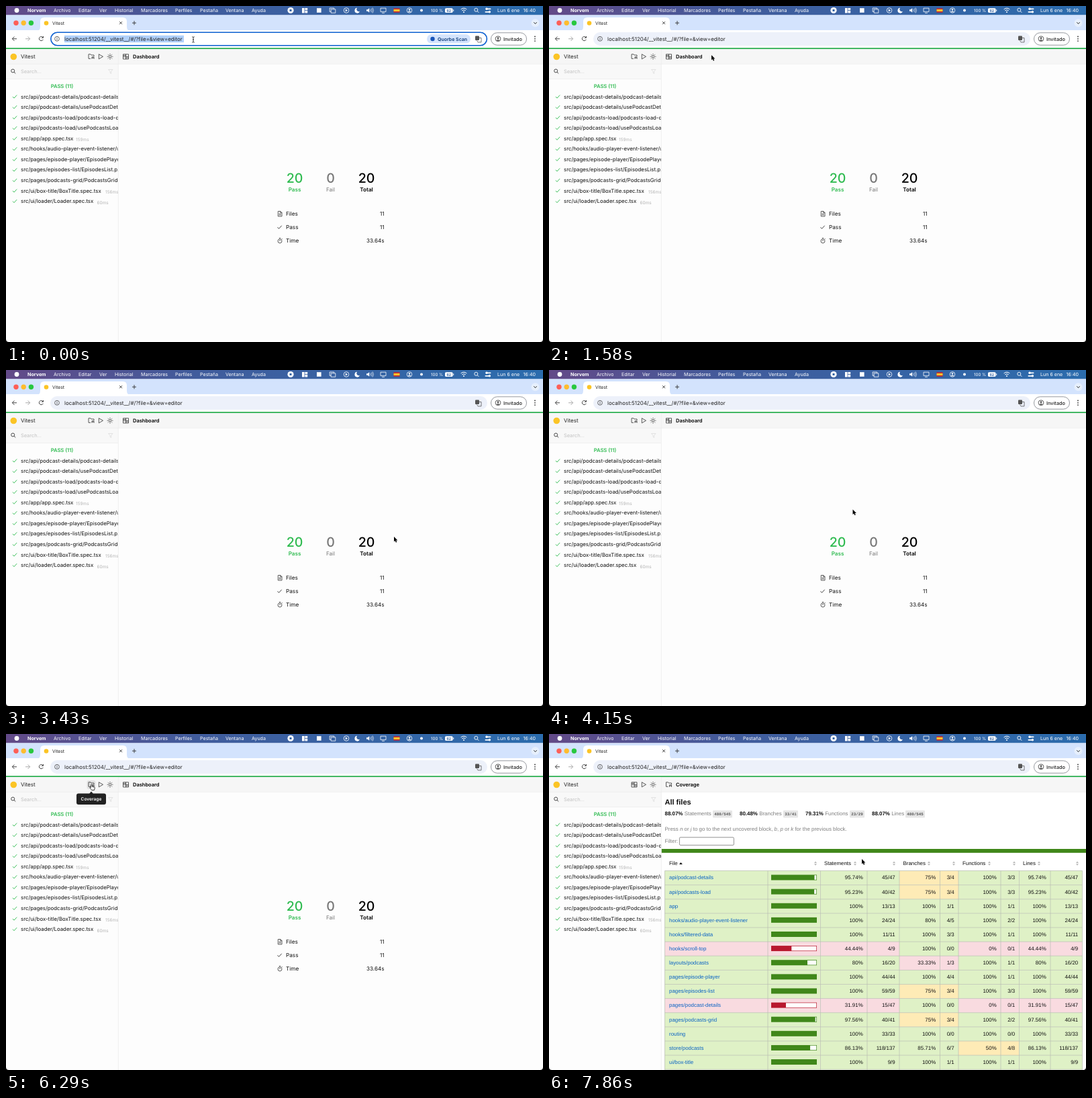
An HTML page for the animation above (8000 ms loop, 800 by 500 pixels).

```html
<!DOCTYPE html>
<html lang="es">
<head>
<meta charset="utf-8">
<title>Vitest</title>
<style>
html, body { margin: 0; width: 100%; height: 100%; overflow: hidden; background: #fff; }
svg { display: block; width: 800px; height: 500px; font-family: Inter, Roboto, sans-serif; text-rendering: geometricPrecision; }
text { white-space: pre; }
.cov { font-family: "Liberation Sans", Arial, sans-serif; }
.mono { font-family: "Liberation Mono", monospace; }
</style>
</head>
<body>
<svg id="stage" viewBox="0 0 800 500"></svg>
<script>
const GREEN = '#2fbb50', BAR = '#40871a';

const text = (x, y, s, size, fill = '#111', more = '') =>
  `<text x="${x}" y="${y}" font-size="${size}" fill="${fill}" ${more}>${s}</text>`;
const rect = (x, y, w, h, fill, more = '') =>
  `<rect x="${x}" y="${y}" width="${w}" height="${h}" fill="${fill}" ${more}/>`;
const circle = (x, y, r, fill, more = '') =>
  `<circle cx="${x}" cy="${y}" r="${r}" fill="${fill}" ${more}/>`;
const line = (d, stroke = '#333', width = 0.8, more = '') =>
  `<path d="${d}" fill="none" stroke="${stroke}" stroke-width="${width}" ${more}/>`;
const fill = (d, color) => `<path d="${d}" fill="${color}"/>`;
const group = (id, body, more = '') => `<g id="${id}" ${more}>${body}</g>`;
const bold = w => `font-weight="${w}"`;
const mid = 'text-anchor="middle"', end = 'text-anchor="end"';
const check = (x, y, color, s = 1) =>
  line(`M${x - 3 * s} ${y}l${2 * s} ${2.2 * s}l${4.2 * s} ${-4.6 * s}`, color, 0.9);

// Icons centred on x, y
const folder = (x, y) => line(`M${x - 1} ${y + 3}h-3v-6.5h3l1 1.2h4v2M${x + 1} ${y + 3.5}v-3h3v3M${x + 1} ${y + 1.8}h3`);
const grid = (x, y) => line(`M${x - 4} ${y - 3.5}h8v7.2h-8zM${x - 4} ${y}h8M${x} ${y - 3.5}v7.2M${x - 4} ${y - 1.8}h4M${x} ${y + 1.8}h4`);
const lens = (x, y, c, r = 2.5) =>
  circle(x, y, r, 'none', `stroke="${c}" stroke-width=".9"`) + line(`M${x + r * .7} ${y + r * .7}l2.3 2.3`, c, 0.9);

function menuBar() {
  const W = '#fff', B = '#3565a5';
  const items = [['Archivo', 71], ['Editar', 108], ['Ver', 139], ['Historial', 162], ['Marcadores', 201],
    ['Perfiles', 252], ['Pestaña', 289], ['Ventana', 327], ['Ayuda', 366]];
  const ring = (x, r) => circle(x, 6.5, r, 'none', 'stroke="#fff" stroke-width=".8"');
  return `<linearGradient id="sky"><stop stop-color="#634a88"/><stop offset=".35" stop-color="#415c9c"/>
    <stop offset="1" stop-color="#2b6cad"/></linearGradient>` +
    rect(0, 0, 800, 13.5, 'url(#sky)') + circle(16, 6.5, 3.4, W) +
    text(32, 9.2, 'Norvem', 7.1, W, bold(700)) +
    items.map(([s, x]) => text(x, 9.2, s, 7.1, W)).join('') +
    circle(424, 6.5, 4.6, W) + rect(422.5, 5, 3, 3, B, 'rx=".6"') +
    rect(441, 3, 3.6, 7.5, W) + rect(445.4, 3, 3.8, 3.2, W) + rect(445.4, 7, 3.8, 3.5, W) +
    rect(463, 3.2, 6.6, 6.6, W) +
    line('M484 8.5h-1.8v-5.5h6.5v1.7M484.2 4.8h6.6v5.5h-6.6z', W) +
    ring(507, 3.8) + fill('M505.8 4.6l3.2 1.9l-3.2 1.9z', W) +
    fill('M523 2.8a3.9 3.9 0 1 0 4 5.2a3.4 3.4 0 0 1-4-5.2z', W) +
    fill('M537 5.2h1.8l2.4-2v6.6l-2.4-2H537z', W) +
    line('M542.6 4.8q1.3 1.7 0 3.4M544.3 3.6q2.3 2.9 0 5.8M546 2.5q3 4 0 8', W, 0.7) +
    line('M558 3.2h8v5.4h-8zM560 10.4h4', W) +
    rect(577.5, 3.3, 9, 6.4, '#c4222f') + rect(577.5, 4.9, 9, 3.2, '#f5c32c') +
    ring(601, 3.8) + circle(601, 5.5, 1.3, W) + fill('M598.6 9a2.5 2.2 0 0 1 4.8 0z', W) +
    circle(619, 6.5, 2, W) +
    text(633, 9, '100 %', 6.2, W) +
    rect(654, 3.3, 11.6, 6.6, W, 'rx="1.6"') + rect(666.2, 5.4, 1, 2.4, W) +
    text(659.8, 8.6, '62', 5.2, B, mid + bold(700)) +
    line('M677.6 5q4.4-3.6 8.8 0M679.2 6.9q2.8-2.2 5.6 0', W, 1) + circle(682, 8.9, 1, W) +
    lens(700.3, 5.8, W) +
    line('M716 4.3h5.6M714.4 8.8h5.6', W, 1.8, 'stroke-linecap="round"') +
    circle(716, 4.3, 1.7, W) + circle(720.4, 8.8, 1.7, W) +
    text(732, 9.2, 'Lun 6 ene', 7.1, W) + text(789, 9.2, '16:40', 7.1, W, end);
}

function browser() {
  return rect(0, 13.5, 800, 24, '#d3e3fd') + rect(0, 36, 800, 27, '#fff') +
    ['#fe5f57', '#febc2e', '#28c840'].map((c, i) => circle(15 + 11.2 * i, 25.3, 3.7, c)).join('') +
    fill('M45 37q6 0 6-6V23q0-6 6-6H174q6 0 6 6v8q0 6 6 6z', '#fff') +
    circle(60, 25.5, 3.3, '#fbc425') + text(69, 27.9, 'Vitest', 6.7, '#222') +
    line('M169 23.2l4 4M173 23.2l-4 4M191 22.2v6M188 25.2h6', '#333', 0.9) +
    circle(788.5, 25.3, 6, '#e6effd') + line('M786.3 24.3l2.2 2.2l2.2-2.2', '#222', 1) +
    line('M16 48.8h-6.5M12.5 45.6l-3.2 3.2l3.2 3.2', '#444', 1) +
    line('M29 48.8h6.5M32.5 45.6l3.2 3.2l-3.2 3.2', '#aaa', 1) +
    line('M55 46.8a3.1 3.1 0 1 0 .3 3M55.5 45v2.3h-2.4', '#444', 1) +
    group('idle', rect(66, 39, 651, 20, '#edf1fa', 'rx="10"')) +
    group('focus', rect(66.8, 39.3, 649.6, 19.4, '#fff', 'rx="9.7" stroke="#0b5fd0" stroke-width="1.6"') +
      rect(87, 43.8, 178, 10.4, '#b0d0fa') + rect(627, 42.2, 65, 13.4, '#d3e3fd', 'rx="6.7"') +
      circle(635.5, 49, 3.2, '#1a56b8') + text(643, 51.6, 'Quorbe Scan', 7, '#0b3a78', bold(600))) +
    circle(76, 48.8, 3.4, 'none', 'stroke="#444" stroke-width=".8"') + line('M76 48.2v2.3M76 46.6v.9', '#444', 0.9) +
    text(87, 51.6, 'localhost:51204/__vitest__/#/?file=&amp;view=editor', 7.9, '#222') +
    rect(699, 44.6, 6, 6.4, '#555', 'rx="1"') + line('M703.5 47.5h4.5v6.4h-5l-1.5-2.5', '#555') +
    rect(722.5, 39.8, 53, 18.4, '#fff', 'rx="9.2" stroke="#7b7f87" stroke-width=".8"') +
    circle(733, 48.8, 3.9, 'none', 'stroke="#333" stroke-width=".8"') + circle(733, 47.7, 1.3, '#333') +
    fill('M730.6 51.4a2.6 2.1 0 0 1 4.8 0z', '#333') +
    text(741, 51.5, 'Invitado', 7.35, '#222', bold(500)) +
    [45.5, 48.8, 52.1].map(y => circle(788, y, 0.9, '#333')).join('');
}

function sidebar() {
  const files = ['api/podcast-details/podcast-details.spec.tsx', 'api/podcast-details/usePodcastDetails.spec.tsx',
    'api/podcasts-load/podcasts-load-data.spec.ts', 'api/podcasts-load/usePodcastsLoad.spec.tsx', 'app/app.spec.tsx',
    'hooks/audio-player-event-listener/use.spec.tsx', 'pages/episode-player/EpisodePlayer.spec.tsx',
    'pages/episodes-list/EpisodesList.p.spec.tsx', 'pages/podcasts-grid/PodcastsGrid.spec.tsx',
    'ui/box-title/BoxTitle.spec.tsx', 'ui/loader/Loader.spec.tsx'];
  const times = { 4: [104, '159ms'], 9: [148, '156ms'], 10: [135.5, '60ms'] };
  const rows = files.map((f, i) => {
    const y = 134.9 + 15.56 * i;
    return check(13, y, GREEN) + text(22, y + 2.6, 'src/' + f, 7.83) +
      (times[i] ? text(times[i][0], y + 4.2, times[i][1], 6.5, '#b4b4b4') : '');
  }).join('');
  const rays = [0, 1, 2, 3, 4, 5, 6, 7].map(i => {
    const c = Math.cos(i * Math.PI / 4), s = Math.sin(i * Math.PI / 4);
    return `M${155 + 3 * c} ${75.3 + 3 * s}L${155 + 4.4 * c} ${75.3 + 4.4 * s}`;
  }).join('');
  return `<clipPath id="side"><rect y="62" width="167" height="438"/></clipPath><g clip-path="url(#side)">` +
    rect(0, 64, 167, 436, '#fdfdfd') + rect(0, 64, 167, 22, '#f6f6f6') + rect(0, 86, 167, 22.5, '#f8f8f8') +
    line('M0 86.3h167M0 108.7h167', '#ececec') +
    circle(11.3, 75.5, 4.8, '#fbc425') + text(22, 78.3, 'Vitest', 8, '#222') +
    group('hover', rect(120.5, 69, 13, 13, '#e2e2e2', 'rx="3"')) +
    group('toCoverage', folder(127, 75.3)) + group('toDash', grid(127, 75.3)) +
    line('M138.3 71.7l6.2 3.6l-6.2 3.6z') + circle(155, 75.3, 1.8, 'none', 'stroke="#333" stroke-width=".8"') + line(rays) +
    lens(10.2, 96.5, '#333') + text(22, 99.9, 'Search...', 7.4, '#c2c2c2') +
    line('M152.5 94.5h6.5l-2.4 3v3l-1.6-1v-2z', '#ddd') +
    text(83.5, 122, 'PASS (11)', 7.6, GREEN, mid + bold(600)) + rows + '</g>' +
    line('M167.3 64V500', '#ececec');
}

function dashboard() {
  const stats = [[430, 20, 'Pass', GREEN, 600], [483.5, 0, 'Fail', '#777', 400], [537, 20, 'Total', '#000', 600]];
  const rows = [['Files', '11'], ['Pass', '11'], ['Time', '33.64s']];
  return grid(178.5, 75.3) + text(189, 78.2, 'Dashboard', 7.5, '#000', bold(600)) +
    stats.map(([x, n, s, c, w]) => text(x, 263.3, n, 19.6, c, mid + bold(500)) + text(x, 276.3, s, 8.1, c, mid + bold(w))).join('') +
    rows.map(([a, b], i) => text(417, 312.1 + 20 * i, a, 8.2) + text(563.5, 312.1 + 20 * i, b, 8.1, '#111', end)).join('') +
    line('M405.3 305.5h3.7l2 2v5.5h-5.7zM408.8 305.5v2.2h2.2M406.6 309.3h3M406.6 311h3') +
    check(407.5, 329.2, '#333') +
    circle(408, 349.8, 3, 'none', 'stroke="#333" stroke-width=".8"') + line('M408 348v2M406.8 345.4h2.4M410.8 347l.8-.8');
}

function coverage() {
  const names = ['api/podcast-details', 'api/podcasts-load', 'app', 'hooks/audio-player-event-listener',
    'hooks/filtered-data', 'hooks/scroll-top', 'layouts/podcasts', 'pages/episode-player', 'pages/episodes-list',
    'pages/podcast-details', 'pages/podcasts-grid', 'routing', 'store/podcasts', 'ui/box-title'];
  const counts = ['45/47 3/4 3/3', '40/42 3/4 3/3', '13/13 1/1 1/1', '24/24 4/5 2/2', '11/11 3/3 1/1', '4/9 0/0 0/1',
    '16/20 1/3 1/1', '44/44 4/4 1/1', '59/59 3/4 3/3', '15/47 0/0 0/1', '40/41 3/4 2/2', '33/33 0/0 0/0',
    '118/137 6/7 4/8', '9/9 1/1 1/1'];
  const cols = [404.5, 474, 522, 582.5, 610, 673, 700.5, 747, 794.5];
  const top = 203.5, pitch = 21.12;
  const percent = f => {
    const [a, b] = f.split('/').map(Number);
    return b ? Math.floor(a / b * 1e4) / 100 : 100;
  };
  const tone = p => p < 50 ? '#f9dbe0' : p < 80 ? '#feebb6' : '#dff1c6';
  const label = (x, y, s, more) => text(x, y, s, 7.92, '#111', more);

  const rows = names.map((name, i) => {
    const y = top + pitch * i, base = y + 12.9;
    const parts = counts[i].split(' '), p = percent(parts[0]);
    const c = p < 50 ? '#b8182e' : BAR;
    return rect(172.5, y, 232, pitch, tone(p)) + text(179, base, name, 7.92, '#0a63c4') +
      rect(331, y + 6, 68, 8, c) + rect(331.7 + 66.6 * p / 100, y + 6.7, 66.6 * (1 - p / 100), 6.6, '#fff') +
      [...parts, parts[0]].map((f, k) => {
        const [a, b, z] = cols.slice(2 * k), v = percent(f);
        return rect(a, y, z - a, pitch, tone(v)) + label(b - 6.3, base, v + '%', end) + label(z - 6.3, base, f, end);
      }).join('') + line(`M172.5 ${y}H794.5`, '#b9bdb2', 0.7);
  }).join('');

  const sums = [[172.5, '88.07%', 'Statements', 244, 29, '480/545'], [284, '80.48%', 'Branches', 349, 22, '33/41'],
    [382, '79.31%', 'Functions', 448, 22, '23/29'], [481, '88.07%', 'Lines', 531, 29, '480/545']];
  const heads = [['File', 179], ['Statements', 410], ['Branches', 527.5], ['Functions', 616], ['Lines', 706]];
  const sorts = [397, 456, 514, 566, 603, 656, 693, 730, 787];
  const i = s => `<tspan font-style="italic">${s}</tspan>`;

  return rect(168, 87, 632, 413, '#fff') + folder(178.5, 75.3) + text(189, 78.2, 'Coverage', 7.5, '#000', bold(600)) +
    `<g class="cov">` + text(172.5, 105.2, 'All files', 11, '#111', bold(700)) +
    sums.map(([x, p, s, bx, w, f]) =>
      text(x, 121.3, `<tspan fill="#111" font-weight="700">${p}</tspan> ${s}`, 7.95, '#7f7f7f') +
      rect(bx, 113.8, w, 10.6, '#e6e6e6', 'rx="1"') +
      text(bx + w / 2, 121.2, f, 5.8, '#555', `class="mono" ${mid} ${bold(700)}`)).join('') +
    text(172.5, 144, `Press ${i('n')} or ${i('j')} to go to the next uncovered block, ${i('b')}, ${i('p')} or ${i('k')} for the previous block.`, 7.92, '#7f7f7f') +
    text(172.5, 162.3, 'Filter:', 7.92, '#7f7f7f') +
    rect(194.4, 153.8, 81, 11.6, '#fff', 'rx="1.5" stroke="#767676" stroke-width=".8"') +
    rect(167.5, 171, 632.5, 5.8, BAR) +
    heads.map(([s, x]) => label(x, 195.3, s)).join('') +
    fill('M194 194l2.4-3l2.4 3z', '#111') +
    sorts.map(x => fill(`M${x - 2} 192l2-2.6l2 2.6zM${x - 2} 193.2l2 2.6l2-2.6z`, '#b5b5b5')).join('') +
    rows + line('M172.5 499.2H794.5' + [172.5, 326, ...cols].map(x => `M${x} ${top}V500`).join(''), '#b9bdb2', 0.7) + '</g>';
}

function overlay() {
  const tip = (id, s, w) => group(id, fill('M124 89l3-3.6l3 3.6z', '#222') +
    rect(127 - w / 2, 88.5, w, 16.5, '#222', 'rx="3"') + text(127, 99.3, s, 6.6, '#fff', mid + bold(600)));
  return tip('tipCoverage', 'Coverage', 44) + tip('tipDash', 'Dashboard', 48) +
    fill('M0 495.5V500H4.5Q0 500 0 495.5zM800 495.5V500H795.5Q800 500 800 495.5z', '#000') +
    group('beam', line('M-1.8-4.2q1.8 0 1.8 1V3.2q0 1-1.8 1M1.8-4.2q-1.8 0-1.8 1M1.8 4.2q-1.8 0-1.8-1M-1 0h2', '#111', 0.8)) +
    group('arrow', '<path d="M0 0V7.6L1.7 6L2.9 8.7L4.3 8.1L3.1 5.5H5.4Z" stroke="#fff" stroke-width=".8" paint-order="stroke"/>') +
    group('hand', '<path d="M-1 0q.9-1 1.8 0V2.8l3.2.8q.9.3.7 1.3L4 8H.2L-2.6 4.4q0-1 .8-.9l.8.6Z" fill="#fff" stroke="#111" stroke-width=".8"/>');
}

document.getElementById('stage').innerHTML =
  rect(0, 0, 800, 500, '#fdfdfd') + menuBar() + browser() + rect(0, 62.3, 800, 1.9, '#25ad4c') +
  rect(167, 64.2, 633, 22, '#f6f6f6') + line('M167 86.3H800', '#ececec') +
  group('dash', dashboard()) + group('cover', coverage()) + sidebar() + overlay();

// Pointer stops: step, x, y; seven steps per second
const stops = [[0, 279, 50], [3, 286, 78], [7, 268, 92], [8, 268, 92], [11, 242, 73], [18, 420, 236], [24, 578, 248],
  [34, 327, 167], [37, 168, 92], [38, 168, 92], [42, 127.5, 75.5], [47, 127.5, 75.5], [55, 466, 186]];
const el = id => document.getElementById(id);
const show = (id, on) => el(id).style.display = on ? '' : 'none';

function pointer(n) {
  const k = Math.max(1, stops.findIndex(s => s[0] >= n));
  const [a, x, y] = stops[k - 1], [b, u, v] = stops[k];
  const t = (n - a) / (b - a), e = t * t * (3 - 2 * t);
  return [x + (u - x) * e, y + (v - y) * e];
}

function draw(ms) {
  const n = Math.floor(ms % 8000 * 7 / 1000);
  const [x, y] = pointer(n);
  const covered = n >= 45, onIcon = n >= 42 && n < 48, focused = n < 3;
  show('focus', focused);
  show('idle', !focused);
  show('dash', !covered);
  show('cover', covered);
  show('toCoverage', !covered);
  show('toDash', covered);
  show('hover', onIcon);
  show('tipCoverage', n === 44);
  show('tipDash', covered && onIcon);
  const kind = onIcon ? 'hand' : y < 60 ? 'beam' : 'arrow';
  for (const id of ['beam', 'arrow', 'hand']) show(id, id === kind);
  el(kind).setAttribute('transform', `translate(${x} ${y})`);
}

const start = performance.now();
function tick() {
  draw(performance.now() - start);
  requestAnimationFrame(tick);
}
tick();
</script>
</body>
</html>
```
